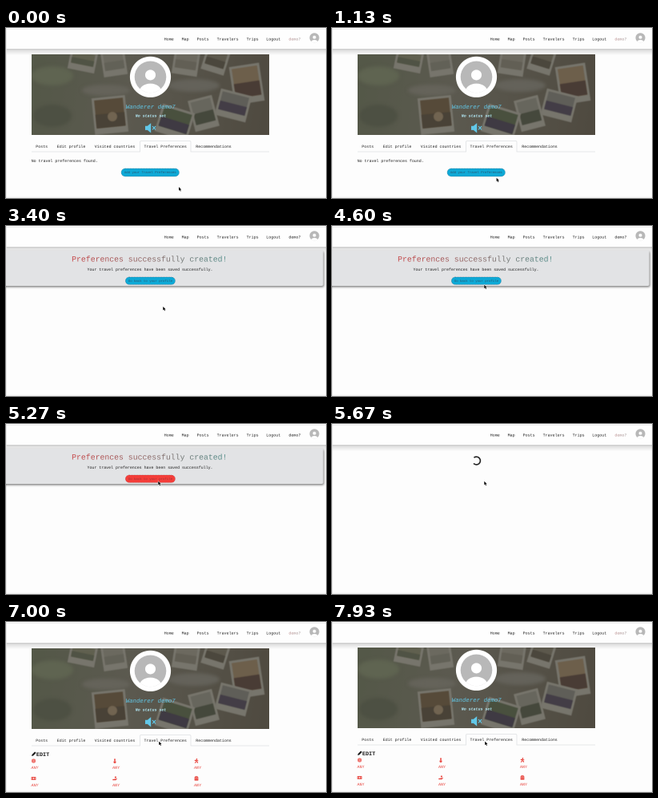
These frames come from a looping animation (400x213 px, 8 s). An HTML page with a canvas:

```html
<!DOCTYPE html>
<html lang="en">
<head>
<meta charset="utf-8">
<title>Travel preferences</title>
<style>
  html, body { margin: 0; width: 100%; height: 100%; overflow: hidden; background: #fdfdfd; }
  canvas { display: block; width: 400px; height: 213px; }
</style>
</head>
<body>
<canvas id="stage"></canvas>
<script>
const W = 400, H = 213, LOOP = 8000, SCALE = 2;
const MONO = '"Liberation Mono", "DejaVu Sans Mono", monospace';
const USER = 'demo7';
const RED = '#e8413a', BLUE = [14, 169, 214], HOT = [244, 62, 58], SKY = '#62c8e8', INK = '#1c1c1c';

function makeLayer(canvas) {
  canvas.width = W * SCALE;
  canvas.height = H * SCALE;
  const c = canvas.getContext('2d');
  c.scale(SCALE, SCALE);
  c.textRendering = 'geometricPrecision';
  return c;
}
const stage = document.getElementById('stage');
const ctx = makeLayer(stage);

// Page switches and state changes, in ms
const T = { hoverAdd: 1250, saved: 2600, hoverBack: 4760, loading: 5330, profile: 5900, prefs: 6880, nudge: 7800 };

// Pointer path: time, x, y
const PATH = [
  [0, 216, 199.2], [270, 216, 199.2], [1070, 206, 188], [1500, 199.3, 184.5],
  [2870, 199.3, 184.5], [3400, 196.3, 101], [3600, 195, 90], [3870, 195, 90],
  [4600, 190.3, 73.7], [4760, 190.3, 71.8], [6470, 190.3, 71.8], [6730, 191.2, 149.6], [8000, 191.2, 149.6]
];

const clamp = v => Math.max(0, Math.min(1, v));
const ease = v => v * v * (3 - 2 * v);
const mix = (a, b, k) => a + (b - a) * k;

function pointerAt(t) {
  const i = Math.max(1, PATH.findIndex(p => p[0] > t));
  const [t0, x0, y0] = PATH[i - 1], [t1, x1, y1] = PATH[i];
  const k = ease((t - t0) / (t1 - t0));
  return [mix(x0, x1, k), mix(y0, y1, k)];
}

function text(str, x, y, size = 4.95, color = INK, style = '', align = 'left') {
  ctx.font = `${style} ${size}px ${MONO}`;
  ctx.textAlign = align;
  ctx.fillStyle = color;
  ctx.fillText(str, x, y);
}

function disc(x, y, r, color) {
  ctx.fillStyle = color;
  ctx.beginPath();
  ctx.arc(x, y, r, 0, 7);
  ctx.fill();
}

function box(x, y, w, h, r, color) {
  ctx.fillStyle = color;
  ctx.beginPath();
  ctx.roundRect(x, y, w, h, r);
  ctx.fill();
}

function shape(path, color) {
  ctx.fillStyle = color;
  ctx.fill(new Path2D(path));
}

function line(path, color, width) {
  ctx.strokeStyle = color;
  ctx.lineWidth = width;
  ctx.stroke(new Path2D(path));
}

function at(x, y, draw, scale = 1) {
  ctx.save();
  ctx.translate(x, y);
  ctx.scale(scale, scale);
  draw();
  ctx.restore();
}

function fade(x0, x1, from, to) {
  const g = ctx.createLinearGradient(x0, 0, x1, 0);
  g.addColorStop(0, from);
  g.addColorStop(1, to);
  return g;
}

function person(x, y, r) {
  ctx.save();
  disc(x, y, r, '#b8b8b8');
  ctx.clip();
  disc(x, y - r * 0.12, r * 0.33, '#fff');
  ctx.beginPath();
  ctx.ellipse(x, y + r * 0.9, r * 0.68, r * 0.48, 0, 0, 7);
  ctx.fill();
  ctx.restore();
}

// Banner: loose prints on a dim, out-of-focus map, painted once
const bannerLayer = document.createElement('canvas');
function paintBanner() {
  const c = makeLayer(bannerLayer);
  c.beginPath();
  c.rect(32, 33, 297, 101);
  c.clip();
  const g = c.createLinearGradient(32, 60, 329, 110);
  g.addColorStop(0, '#545848');
  g.addColorStop(0.4, '#5c5a50');
  g.addColorStop(1, '#4f4a40');
  c.fillStyle = g;
  c.fillRect(32, 33, 297, 101);

  c.filter = 'blur(4px)';
  for (const [x, y, rx, ry, color] of [
    [58, 60, 26, 12, '#5f6451'], [58, 110, 24, 14, '#4d5043'], [125, 78, 30, 7, '#65635a'], [235, 72, 32, 8, '#64625a']
  ]) {
    c.fillStyle = color;
    c.beginPath();
    c.ellipse(x, y, rx, ry, 0, 0, 7);
    c.fill();
  }
  c.filter = 'blur(1px)';
  const print = (x, y, w, h, a, sky, ground) => {
    c.save();
    c.translate(x, y);
    c.rotate(a);
    c.fillStyle = '#77756c';
    c.fillRect(-w / 2, -h / 2, w, h);
    c.fillStyle = sky;
    c.fillRect(-w / 2 + 3, -h / 2 + 3, w - 6, h - 11);
    c.fillStyle = ground;
    c.fillRect(-w / 2 + 3, -2, w - 6, h / 2 - 6);
    c.restore();
  };
  print(96, 41, 34, 26, 0.2, '#60604f', '#505345');
  print(135, 44, 30, 32, -0.15, '#6b695f', '#626157');
  print(225, 43, 32, 32, 0.15, '#6c695f', '#625f55');
  print(262, 41, 30, 30, 0.3, '#5c584c', '#4b473d');
  print(301, 70, 38, 48, -0.15, '#6d5f4b', '#493c35');
  print(284, 97, 40, 34, 0.25, '#5f5e58', '#433d46');
  print(247, 107, 31, 40, -0.25, '#67665d', '#45483c');
  print(130, 109, 42, 46, -0.1, '#564a39', '#494237');
  print(211, 118, 42, 36, 0.3, '#49503e', '#3f3a43');
  c.fillStyle = '#716451';
  c.beginPath();
  c.arc(133, 111, 6, 0, 7);
  c.fill();
}
paintBanner();

function header(active) {
  const g = ctx.createLinearGradient(0, 25, 0, 34);
  g.addColorStop(0, 'rgba(0,0,0,.24)');
  g.addColorStop(0.4, 'rgba(0,0,0,.1)');
  g.addColorStop(1, 'rgba(0,0,0,0)');
  ctx.fillStyle = g;
  ctx.fillRect(0, 25, W, 9);
  ctx.fillStyle = '#fefefe';
  ctx.fillRect(0, 0, W, 26);
  ctx.fillStyle = '#e6e6e6';
  ctx.fillRect(0, 1, W, 0.7);
  ctx.fillRect(0, 0, 0.7, H);
  ctx.fillRect(0, 211.8, W, 0.7);
  const links = { Home: 197.7, Map: 219.6, Posts: 238.6, Travelers: 263.6, Trips: 300.6, Logout: 325.2 };
  for (const name in links) text(name, links[name], 15.7, 5);
  text(USER, 353.4, 15.7, 5, active ? fade(353, 370, '#c08f8f', '#9a9494') : INK);
  person(385.5, 12.3, 6);
}

function button(x, y, w, h, label, hover) {
  const rgb = BLUE.map((v, i) => Math.round(mix(v, HOT[i], hover)));
  const ink = hover > 0.5 ? '#a03236' : '#2f5570';
  box(x, y, w, h, h / 2, `rgb(${rgb})`);
  ctx.setLineDash([1, 1]);
  ctx.strokeStyle = ink;
  ctx.lineWidth = 0.5;
  ctx.stroke();
  ctx.setLineDash([]);
  text(label, x + w / 2, y + h / 2 + 1.2, 4, ink, '', 'center');
}

function tabs(active) {
  const list = [['Posts', 37.3, 32, 57], ['Edit profile', 63.8], ['Visited countries', 110.8],
    ['Travel Preferences', 172.5, 167.5, 231], ['Recommendations', 237.3]];
  const [, , left, right] = list[active];
  line(`M32 155H${left}V143Q${left} 141.5 ${left + 1.5} 141.5H${right - 1.5}Q${right} 141.5 ${right} 143V155H329`, '#dfe1e4', 0.8);
  for (const [label, x] of list) text(label, x, 150);
}

function mute() {
  shape('M174 122.7h2.8l4.4-3.6v12.4l-4.4-3.6H174z', SKY);
  line('M183 123l4 4.4M187 123l-4 4.4', SKY, 1.2);
}

function profile(activeTab) {
  ctx.drawImage(bannerLayer, 0, 0, W, H);
  disc(180.5, 61.3, 25.6, '#fff');
  person(180.5, 61.3, 19.8);
  text('Wanderer ' + USER, 180.7, 101, 7.4, SKY, 'italic', 'center');
  text('No status set', 181, 111.7, 4.95, '#b5ecfa', 'italic bold', 'center');
  mute();
  tabs(activeTab);
}

const ICONS = [
  () => { // globe
    disc(0, 0, 2.9, RED);
    line('M-3 0H3M0-3V3M-1.3-2.6Q-2.2 0-1.3 2.6M1.3-2.6Q2.2 0 1.3 2.6', '#fff', 0.35);
  },
  () => { // thermometer
    box(-1, -3, 2, 5, 1, RED);
    disc(0, 1.7, 1.7, RED);
    line('M0-1.5V1.6', '#fff', 0.5);
  },
  () => { // hiker
    disc(0.5, -2.4, 0.9, RED);
    line('M.2-1.2L-.4 1-2 3M-.4.8L1.5 1.5 1.8 3M-2.5-.6L.2-1 2.5 0', RED, 1.1);
  },
  () => { // bank note
    box(-3.2, -2.1, 6.4, 4.2, 0.5, RED);
    disc(0, 0, 1, '#fff');
    line('M-2.1-1V1M2.1-1V1', '#fff', 0.4);
  },
  () => { // open hand
    shape('M-3 1H-1L0 .5H1.6L3-.4 3.2.2 1.7 2.5H-3z', RED);
    disc(1, -1.6, 1.2, RED);
  },
  () => { // suitcase
    box(-2.7, -1.8, 5.4, 4.7, 0.6, RED);
    line('M-1.3-1.6V-2.8H1.3V-1.6', RED, 0.8);
    line('M-2.7.1H2.7', '#fff', 0.5);
  }
];

function preferences(style) {
  shape('M32 168l.6-2 3.5-3.5 1.5 1.5-3.5 3.5z', INK);
  text('EDIT', 37.9, 168.2, 6.8, INK, 'bold');
  ICONS.forEach((draw, i) => {
    const x = [31.5, 133, 235][i % 3], y = i < 3 ? 174 : 196;
    at(x + 3, y, draw, 0.9);
    text('ANY', x, y + 10, 5, RED, style);
  });
}

function savedPage(hover) {
  ctx.save();
  ctx.shadowColor = 'rgba(0,0,0,.5)';
  ctx.shadowBlur = 5;
  ctx.shadowOffsetX = 2;
  ctx.shadowOffsetY = 3;
  box(-4, 30.5, 400.5, 44.5, 2, '#e2e3e5');
  ctx.restore();
  text('Preferences successfully created!', 179.3, 44.4, 9.82, fade(82, 277, '#c8484a', '#55908c'), '', 'center');
  text('Your travel preferences have been saved successfully.', 180, 55.8, 4.95, INK, '', 'center');
  button(149.3, 64, 62.2, 9.4, 'Go back to your profile', hover);
}

function spinner(t) {
  ctx.strokeStyle = '#222';
  ctx.lineWidth = 1.6;
  const a = (t - 5670) / 750 * Math.PI * 2 - 2.25;
  ctx.beginPath();
  ctx.arc(180.5, 46, 4.9, a, a + 4.6);
  ctx.stroke();
}

function pointer(x, y) {
  at(x, y, () => {
    const arrow = 'M0 0V5L1.2 4 2.1 6 3 5.6 2.1 3.7H3.7z';
    line(arrow, 'rgba(255,255,255,.8)', 0.9);
    shape(arrow, '#000');
  }, 0.9);
}

function render(t) {
  ctx.fillStyle = '#fdfdfd';
  ctx.fillRect(0, 0, W, H);
  const onSaved = t >= T.saved && t < T.loading;
  header(!onSaved);
  if (t < T.saved) {
    profile(3);
    text('No travel preferences found.', 31.7, 168);
    button(144, 176, 72.5, 10, 'Add your Travel Preferences', clamp((t - T.hoverAdd) / 250));
  } else if (onSaved) {
    savedPage(clamp((t - T.hoverBack) / 250));
  } else if (t < T.profile) {
    spinner(t);
  } else if (t < T.prefs) {
    profile(0);
    text('No posts found.', 31.7, 168);
  } else {
    const moved = t >= T.nudge;
    at(0, moved ? -1 : 0, () => {
      profile(3);
      preferences(moved ? '' : 'italic');
    });
  }
  pointer(...pointerAt(t));
}

function tick() {
  render(performance.now() % LOOP);
  requestAnimationFrame(tick);
}
tick();
</script>
</body>
</html>
```
